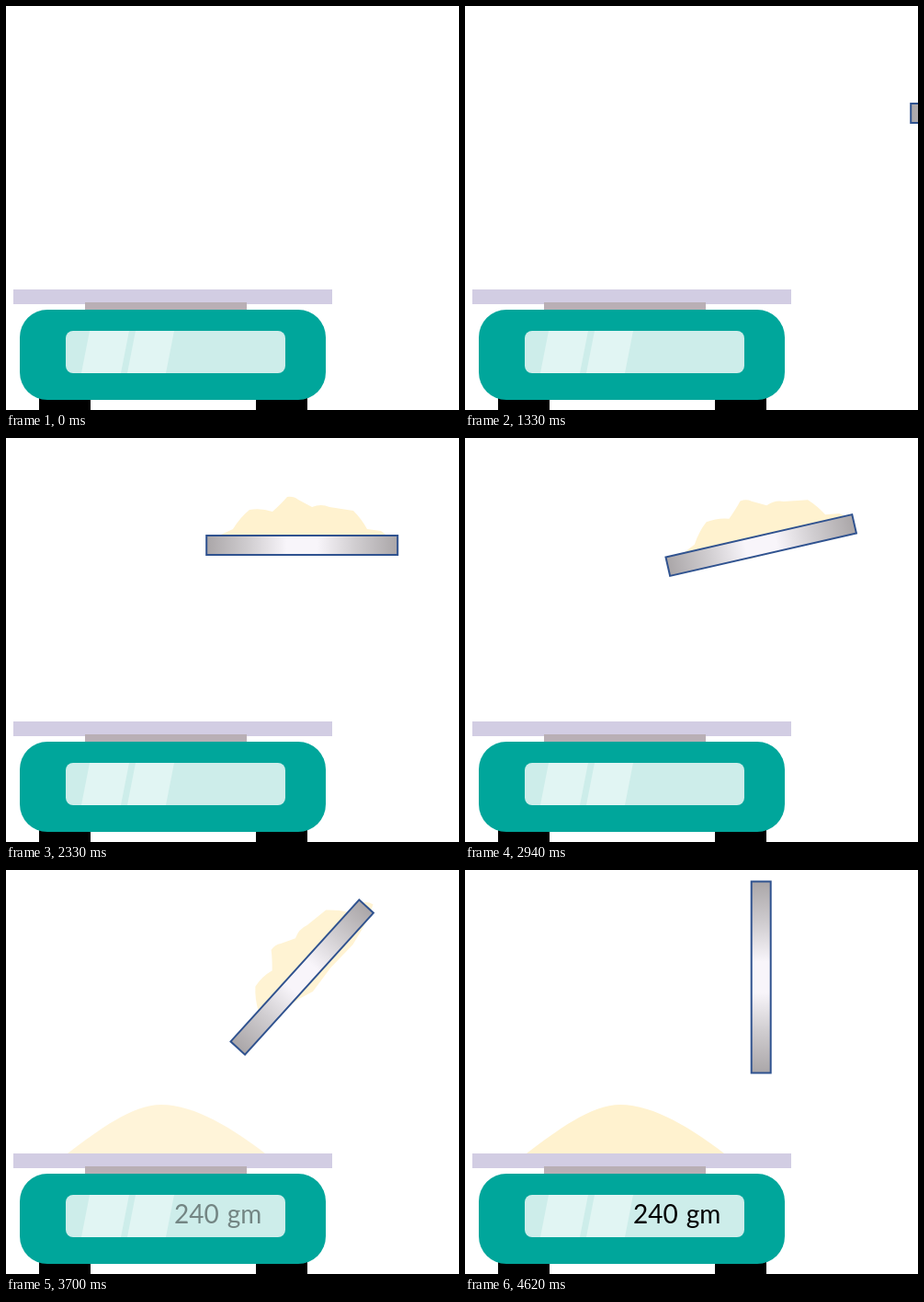
An HTML page that plays this animation: 493x439 px, repeating every 4910 ms.

```html
<!DOCTYPE html>
<html lang="en">
<head>
<meta charset="utf-8">
<title>Kitchen scale</title>
<style>
  html, body { margin: 0; width: 100%; height: 100%; overflow: hidden; background: #fff; }
  svg { display: block; width: 100%; height: 100%; }
  text { font: 28px Lato, sans-serif; word-spacing: 1.8px; }
</style>
</head>
<body>
<svg viewBox="0 0 493 439">
  <defs>
    <linearGradient id="steel">
      <stop offset="0" stop-color="#aaa6a8"/>
      <stop offset=".22" stop-color="#d0cdd0"/>
      <stop offset=".42" stop-color="#f8f5fa"/>
      <stop offset=".58" stop-color="#f8f5fa"/>
      <stop offset=".78" stop-color="#d0cdd0"/>
      <stop offset="1" stop-color="#aaa6a8"/>
    </linearGradient>
  </defs>

  <path id="pile" fill="#fff2cf" d="M67 308C100 283 137 255 169 255C206 255 248 282 282 308Z"/>

  <!-- scale -->
  <path d="M36 426h56v13h-56zM272 426h56v13h-56z"/>
  <rect x="8" y="308" width="347" height="16" fill="#d2cde3"/>
  <rect x="86" y="322" width="176" height="10" fill="#b9afb5"/>
  <rect x="15" y="330" width="333" height="98" rx="30" fill="#00a69b"/>
  <rect x="65" y="353" width="239" height="46" rx="8" fill="#cdedea"/>
  <path fill="#e1f5f3" d="M91 353h43l-9 46h-43zM141 353h42l-9 46h-42z"/>
  <text id="weight" x="183" y="384">240 gm</text>

  <!-- tray of flour -->
  <g id="load">
    <path id="flour" fill="#fff2cf" d="M234 105L247 99Q255 86 265 78Q278 76 290 80Q300 71 306 64Q313 63 318 67L333 75Q343 71 352 75L378 79Q387 88 393 99L408 101Q416 106 417 113L400 120L370 126L335 125L303 128L286 122L255 116Z"/>
    <rect id="tray" x="218.2" y="106" width="208" height="21" fill="url(#steel)" stroke="#2f528f" stroke-width="2"/>
  </g>
</svg>
<script>
  const LOOP = 4910, TICK = 40;
  const [pile, weight, load, flour, tray] =
    ['pile', 'weight', 'load', 'flour', 'tray'].map(id => document.getElementById(id));

  const clamp = v => Math.min(1, Math.max(0, v));
  const ramp = (t, from, to) => clamp((t - from) / (to - from));
  const snap = (t, origin) => origin + Math.floor((t - origin) / TICK) * TICK;

  function draw(t) {
    const slideT = snap(t, 1330), turnT = snap(t, 2660);

    // slides in from the right, slowing to a stop
    const left = Math.max(0, (2270 - slideT) / 940);
    load.setAttribute('transform', `translate(${267 * left * left} 0)`);

    // tray and flour each turn about their own centre
    const angle = -90 * ramp(turnT, 2660, 4620);
    tray.setAttribute('transform', `rotate(${angle} 322.2 116.5)`);
    flour.setAttribute('transform', `rotate(${angle} 323 95)`);

    pile.setAttribute('opacity', ramp(turnT, 3400, 3780));
    weight.setAttribute('opacity', ramp(turnT, 3500, 3960));
    flour.setAttribute('opacity', 1 - ramp(turnT, 3660, 4080));
  }

  const start = performance.now();
  function loop() {
    draw((performance.now() - start) % LOOP);
    requestAnimationFrame(loop);
  }
  loop();
</script>
</body>
</html>
```
